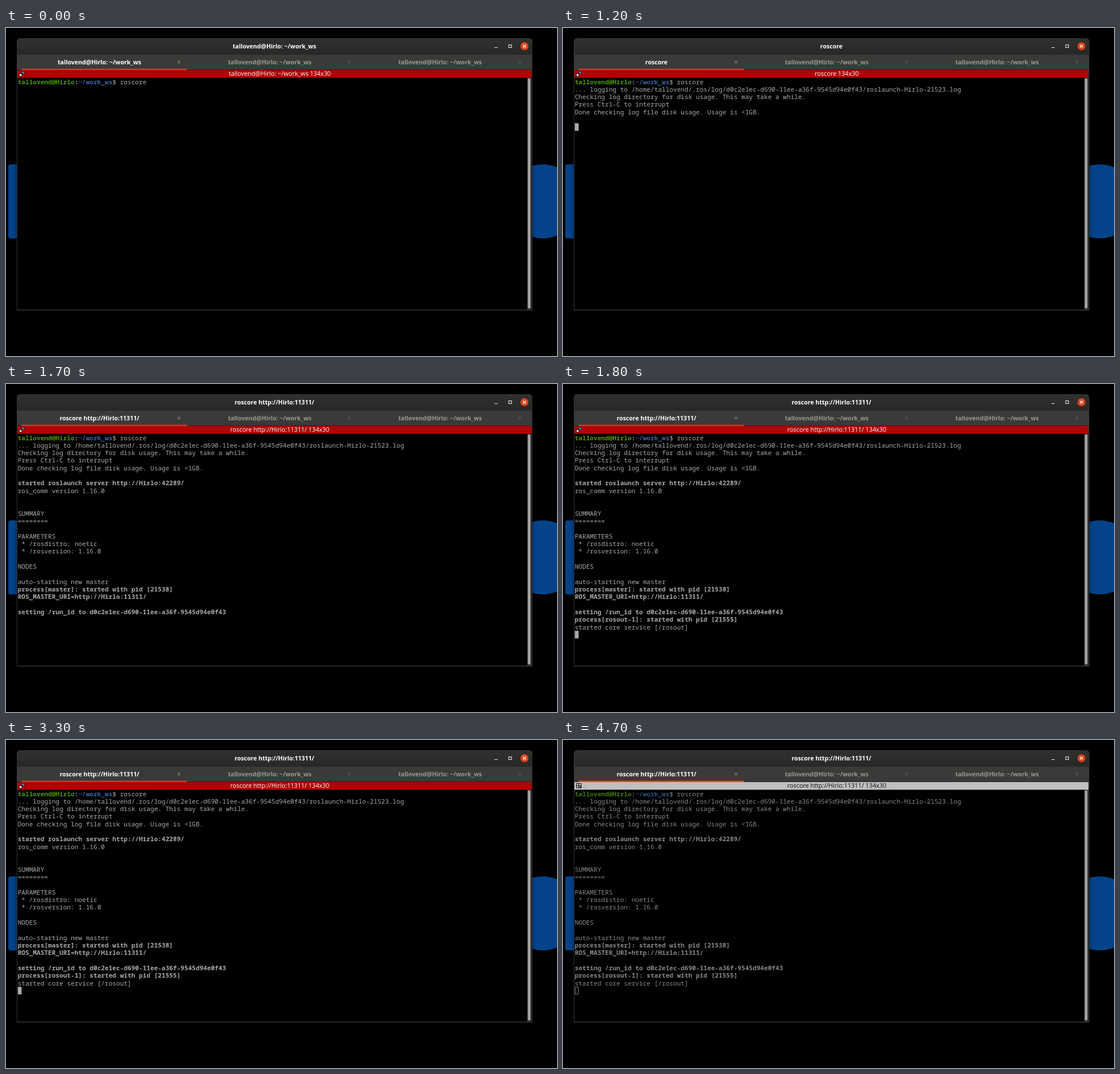
An HTML page that plays this animation: 970x577 px, repeating every 4800 ms.

```html
<!DOCTYPE html>
<html lang="en">
<head>
<meta charset="utf-8">
<title>Terminal session</title>
<style>
  html, body { margin: 0; width: 100%; height: 100%; overflow: hidden; background: #000; }
  svg { display: block; width: 970px; height: 577px; }
  text { white-space: pre; }
  .ui { font: 10.85px "Open Sans", "Noto Sans", sans-serif; text-anchor: middle; }
  .bold { font-size: 10.6px; font-weight: 700; }
  .term { font: 11.11px "Noto Sans Mono", "DejaVu Sans Mono", monospace; fill: var(--fg); }
  .term .strong { font-weight: 700; }
  svg { --fg: #aaa; --user: #4e9a06; --path: #3465a4; --bar: #b40004; --barText: #fff; --line: #c5412d; }
  svg.idle { --fg: #888; --user: #3e7b05; --path: #2a5183; --bar: #c0bebf; --barText: #111; --line: #e9452b; }
  .idle .whenActive, svg:not(.idle) .whenIdle { display: none; }
</style>
</head>
<body>
<svg id="stage" viewBox="0 0 970 577">
  <defs>
    <linearGradient id="head" x2="0" y2="1">
      <stop stop-color="#30302e"/><stop offset="1" stop-color="#282826"/>
    </linearGradient>
    <filter id="soft"><feGaussianBlur stdDeviation="3"/></filter>
  </defs>

  <!-- desktop -->
  <rect width="970" height="577"/>
  <rect x="4" y="240" width="130" height="130" rx="4" fill="#04438a"/>
  <circle cx="945" cy="305" r="65" fill="#04438a"/>

  <!-- window -->
  <rect x="19" y="20" width="907.5" height="478" opacity=".5" filter="url(#soft)"/>
  <path d="M19 497V24q0-6 6-6H920.5q6 0 6 6V497Z" fill="#343432"/>
  <path d="M20 46V25q0-6 6-6H919.5q6 0 6 6V46Z" fill="url(#head)"/>
  <rect x="20" y="46" width="905.5" height="28" fill="#3a3a38"/>
  <path d="M20 46.5H925.5M20 73.3H925.5" stroke="#282826" stroke-width="1.2"/>
  <rect x="20" y="87" width="897" height="408.5"/>
  <rect x="917" y="87" width="8.5" height="408.5" fill="#282827"/>
  <rect x="918.7" y="88.5" width="4.6" height="405" rx="2.2" fill="#a9a8a6"/>
  <rect x="20" y="74" width="905" height="13.5" fill="var(--bar)"/>
  <rect x="27" y="71.6" width="292" height="2.4" fill="var(--line)"/>

  <!-- window buttons -->
  <path d="M860 34.5h5.5M885 29.5h5v5h-5z" fill="none" stroke="#f0f0ee" stroke-width="1.1"/>
  <circle cx="912.7" cy="32" r="7" fill="#dc461f"/>
  <path d="M910.2 29.5l5 5m0-5l-5 5" stroke="#fff" stroke-width="1.1"/>

  <!-- tab close marks -->
  <g fill="none">
    <path d="M302 57.5l5 5m0-5l-5 5" stroke="#a3a3a0"/>
    <path d="M602 57.5l5 5m0-5l-5 5M902 57.5l5 5m0-5l-5 5" stroke="#686865"/>
  </g>

  <!-- group icon -->
  <g class="whenActive">
    <rect x="27.2" y="75.6" width="5.8" height="5.4" fill="#222"/>
    <rect x="28.4" y="76.6" width="3.6" height="3.4" fill="#3f86bd"/>
    <rect x="22.8" y="79.8" width="5.4" height="5.4" fill="#222"/>
    <rect x="24" y="81" width="3.4" height="3.4" fill="#ddd"/>
  </g>
  <g class="whenIdle">
    <path d="M23.5 76.5h8.5v7.5h-8.5zM27.8 76.5v7.5M23.5 80.3h8.5" fill="none" stroke="#111"/>
    <path d="M28.5 82h5l-2.5 3z" fill="#111"/>
    <path d="M38.5 75v11" stroke="#aaa8a9"/>
  </g>

  <g class="ui">
    <text id="winTitle" class="bold" x="472.5" y="36.3" fill="#fff"/>
    <text id="tabTitle" class="bold" x="164.5" y="63.6" fill="#fff"/>
    <text class="bold shell" x="464.2" y="63.6" fill="#989895"/>
    <text class="bold shell" x="764.2" y="63.6" fill="#989895"/>
    <text id="barTitle" x="482" y="84.4" fill="var(--barText)"/>
  </g>
  <g id="term" class="term"></g>
  <rect id="cursor"/>
</svg>
<script>
const LOOP = 4800, LEFT = 21, TOP = 87.5, CELL_W = 6.667, CELL_H = 13.333;
const user = "tallovend", host = "Hirlo";
const runId = "d0c2e1ec-d690-11ee-a36f-9545d94e0f43";
const shell = `${user}@${host}: ~/work_ws`;
const master = `http://${host}:11311/`;
const titles = [shell, "roscore", `roscore ${master}`];

// A leading "!" marks a bold line.
const lines = [
  "",
  `... logging to /home/${user}/.ros/log/${runId}/roslaunch-${host}-21523.log`,
  "Checking log directory for disk usage. This may take a while.",
  "Press Ctrl-C to interrupt",
  "Done checking log file disk usage. Usage is <1GB.",
  "",
  `!started roslaunch server http://${host}:42289/`,
  "ros_comm version 1.16.0",
  "", "",
  "SUMMARY",
  "========",
  "",
  "PARAMETERS",
  " * /rosdistro: noetic",
  " * /rosversion: 1.16.0",
  "",
  "NODES",
  "",
  "auto-starting new master",
  "!process[master]: started with pid [21538]",
  `!ROS_MASTER_URI=${master}`,
  "",
  `!setting /run_id to ${runId}`,
  "!process[rosout-1]: started with pid [21555]",
  "started core service [/rosout]"
];

// time, visible lines, title, cursor row (-1 = hidden), cursor column
const steps = [
  [0, 1, 0, -1, 0],
  [500, 1, 0, 0, 34],
  [700, 1, 0, 1, 0],
  [1200, 5, 1, 6, 0],
  [1400, 21, 1, -1, 0],
  [1700, 24, 2, -1, 0],
  [1800, 26, 2, 26, 0],
  [2400, 26, 2, -1, 0],
  [3300, 26, 2, 26, 0],
  [3700, 26, 2, -1, 0],
  [4300, 26, 2, 26, 0],
  [4700, 26, 2, 26, 0, "idle"]
];

const $ = id => document.getElementById(id);
const stage = $("stage"), cursor = $("cursor");

function addText(row, col, str, bold, fill) {
  const el = document.createElementNS("http://www.w3.org/2000/svg", "text");
  el.setAttribute("x", LEFT - 0.3 + col * CELL_W);
  el.setAttribute("y", TOP + row * CELL_H + 11);
  el.textContent = str;
  if (bold) el.classList.add("strong");
  if (fill) el.style.fill = fill;
  $("term").append(el);
  return el;
}

addText(0, 0, `${user}@${host}`, true, "var(--user)");
addText(0, 15, ":", true);
addText(0, 16, "~/work_ws", true, "var(--path)");
addText(0, 25, "$ roscore");
const rows = lines.map((s, i) => addText(i, 0, s.replace(/^!/, ""), s[0] === "!"));
document.querySelectorAll(".shell").forEach(el => el.textContent = shell);

function show([, count, title, row, col, idle]) {
  rows.forEach((el, i) => el.style.display = i < count ? "" : "none");
  $("winTitle").textContent = $("tabTitle").textContent = titles[title];
  $("barTitle").textContent = `${titles[title]} 134x30`;
  stage.classList.toggle("idle", !!idle);
  cursor.style.display = row < 0 ? "none" : "";
  const inset = idle ? 0.5 : 0;
  cursor.setAttribute("x", LEFT + col * CELL_W + inset - 0.2);
  cursor.setAttribute("y", TOP + row * CELL_H + inset);
  cursor.setAttribute("width", CELL_W - 2 * inset);
  cursor.setAttribute("height", CELL_H - 2 * inset);
  cursor.style.fill = idle ? "none" : "var(--fg)";
  cursor.style.stroke = idle ? "var(--fg)" : "none";
}

const start = performance.now();
let current;
function tick() {
  const t = (performance.now() - start) % LOOP;
  const step = steps.findLast(s => s[0] <= t);
  if (step !== current) show(current = step);
  requestAnimationFrame(tick);
}
tick();
</script>
</body>
</html>
```
